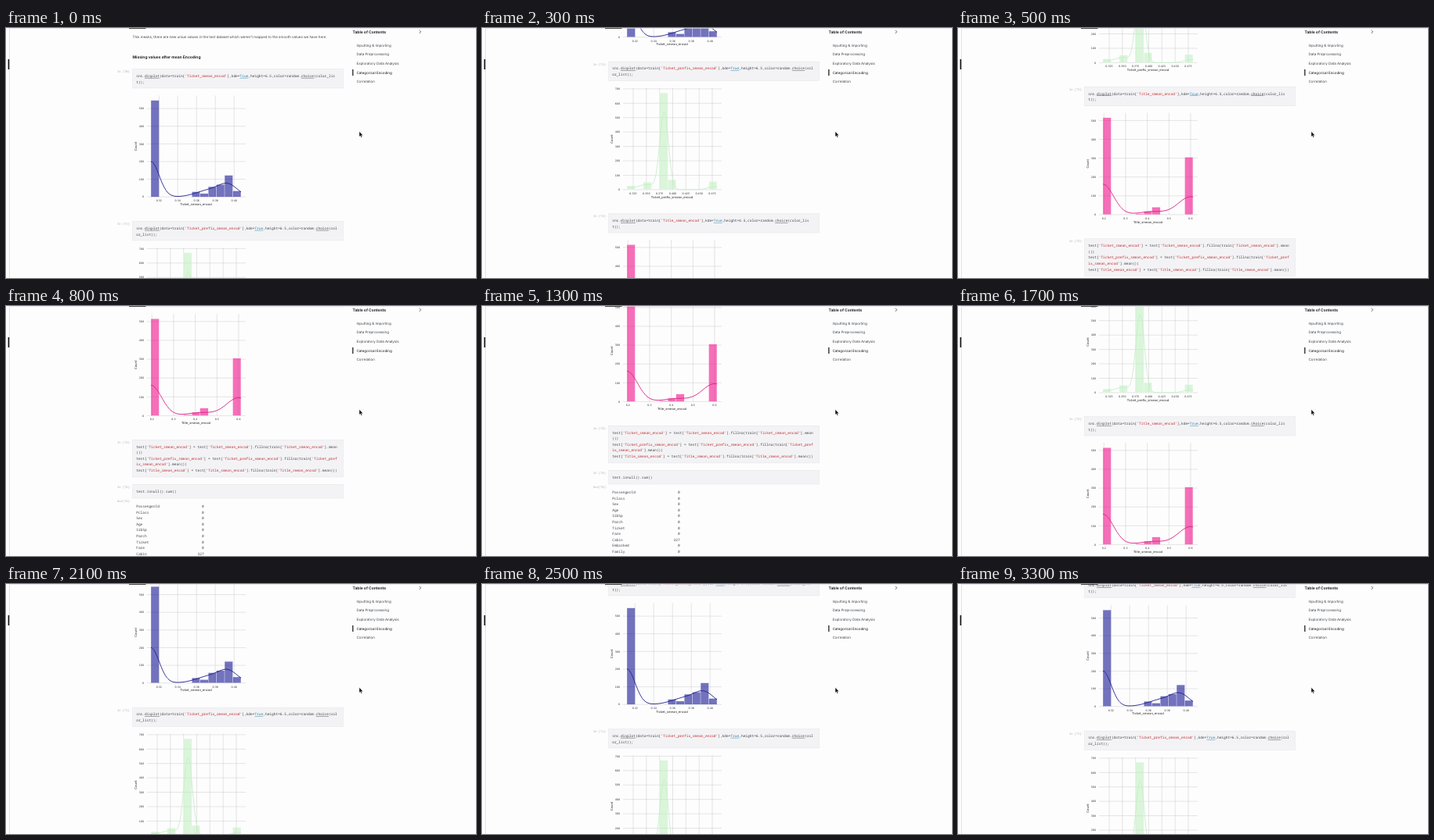
Animation of 600x320 px, one loop 3400 ms. Source, as an HTML page:

```html
<!DOCTYPE html>
<html lang="en">
<head>
<meta charset="utf-8">
<title>Notebook scroll</title>
<style>
  html, body { margin: 0; width: 100%; height: 100%; overflow: hidden; background: #fdfdfe; }
  svg { display: block; width: 100vw; height: 100vh; }
  text { white-space: pre; text-rendering: geometricPrecision; }
  .prose { font: 4.49px Inter, sans-serif; fill: #3c4043; }
  .head { font: 700 4.95px Inter, sans-serif; fill: #202124; }
  .code { font: 4.51px "Noto Sans Mono", monospace; fill: #3f4245; }
  .prompt { font: 3.75px "Noto Sans Mono", monospace; fill: #a9abb0; text-anchor: end; }
  .tick { font: 3.3px "DejaVu Sans", sans-serif; fill: #333; }
  .label { font: 3.9px "DejaVu Sans", sans-serif; fill: #222; text-anchor: middle; }
  .mid { text-anchor: middle; }
  .end { text-anchor: end; }
  .str { fill: #c0282d; }
  .kw { fill: #2f80a8; text-decoration: underline; }
  .fn { text-decoration: underline; }
  .cell { fill: #f3f3f5; stroke: #e3e3e6; stroke-width: .5; }
  .grid { stroke: #cbcbcb; stroke-width: .5; fill: none; }
  .active { fill: #111; }
</style>
</head>
<body>
<svg viewBox="0 0 600 320" preserveAspectRatio="none">
  <g id="page"></g>
  <path d="M4 .4H600" stroke="#dedee6" stroke-width=".8"/>
  <path d="M4.5 0V320" stroke="#dcdce2" stroke-width=".8"/>
  <path d="M157 .4H178.5" stroke="#222" stroke-width=".9"/>
  <rect x="2.6" y="40" width="1.6" height="13" fill="#111"/>
  <g id="toc">
    <text class="head" x="442.5" y="7.4">Table of Contents</text>
    <path d="M527.6 2.8L529.7 4.9L527.6 7" fill="none" stroke="#333" stroke-width=".7"/>
    <rect x="442.2" y="53" width="1.2" height="8" fill="#111"/>
  </g>
  <path d="M451 132.6V139.2L452.5 137.8L453.5 140.2L454.6 139.7L453.6 137.4H455.7Z" fill="#000" stroke="#fff" stroke-width=".4"/>
</svg>
<script>
const page = document.getElementById('page');
const toc = document.getElementById('toc');
const LINE = 7.62, BIN = 10.45, LEFT = 185;

const text = (cls, x, y, s, more = '') => `<text class="${cls}" x="${x}" y="${y}" ${more}>${s}</text>`;

function paint(code) {
  return code.replace(/('[^']*')|\b(True)\b|\b(displot|choice)\b/g, (m, str, kw) => {
    const open = `<tspan class="${str ? 'str' : kw ? 'kw' : 'fn'}">`;
    return open + m.replace('\n', `</tspan>\n${open}`) + '</tspan>';
  });
}

function lines(code, y) {
  return code.split('\n').map((s, i) => text('code', 166.2, y + i * LINE, s)).join('');
}

function cell(top, height, num, code) {
  return `<rect class="cell" x="161.7" y="${top}" width="268.6" height="${height}"/>` +
    text('prompt', 160, top + 4.6, `In [${num}]:`) + lines(paint(code), top + 10.3);
}

function plotCell(top, num, col, wrap) {
  return cell(top, 24.3, num,
    `sns.displot(data=train['${col}'],kde=True,height=6.5,color=random.choice(${wrap}));`);
}

// bars: [bin, count]; bumps: [height, centre, spread] of the density curve
function chart({ base, unit, max, xs, x0, dx, name, color, line, alpha, bars, bumps }) {
  const Y = v => base - v * unit / 100;
  const top = Y(max * 1.05);
  let grid = '', labels = '', curve = '';
  for (let v = 0; v <= max * 1.05; v += 100) {
    grid += `M180 ${Y(v)}H306`;
    labels += text('tick end', 176, Y(v) + 1.2, v);
  }
  xs.forEach((s, i) => {
    const x = x0 + i * dx;
    grid += `M${x} ${top}V${base}`;
    labels += text('tick mid', x, base + 5.8, s);
  });
  const rects = bars.map(([i, v]) =>
    `<rect x="${LEFT + i * BIN}" y="${Y(v)}" width="${BIN}" height="${base - Y(v)}" fill="${color}" fill-opacity="${alpha}" stroke="#fff" stroke-width=".3"/>`).join('');
  for (let x = LEFT; x <= 300; x++) {
    const v = bumps.reduce((sum, [h, m, s]) => sum + h * Math.exp(-(((x - m) / s) ** 2) / 2), 0);
    curve += `${curve ? 'L' : 'M'}${x} ${Y(v).toFixed(2)}`;
  }
  const mid = (top + base) / 2;
  return `<path class="grid" d="${grid}"/>${rects}` +
    `<path d="${curve}" fill="none" stroke="${line}" stroke-width=".9"/>` + labels +
    text('label', 242.5, base + 10.7, name) +
    text('label', 167, mid, 'Count', `transform="rotate(-90 167 ${mid})"`);
}

const nulls = ['PassengerId', 'Pclass', 'Sex', 'Age', 'SibSp', 'Parch', 'Ticket', 'Fare', 'Cabin', 'Embarked', 'Family']
  .map(s => s + (s === 'Cabin' ? '327' : '0').padStart(32 - s.length)).join('\n');

page.innerHTML =
  text('prose', 161.5, 13.1, "This means, there are new uniue values in the test dataset which weren't mapped to the smooth values we have here") +
  text('head', 161.5, 38.6, 'Missing values after mean Encoding') +
  plotCell(52.6, 70, 'Ticket_smean_encod', 'color_lis\nt') +
  chart({
    base: 216.2, unit: 22.62, max: 546, name: 'Ticket_smean_encod',
    xs: ['0.32', '0.34', '0.36', '0.38', '0.40'], x0: 195.3, dx: 23.97,
    color: '#00008b', line: '#23238f', alpha: .55,
    bars: [[0, 546], [5, 29], [6, 19], [7, 58], [8, 70], [9, 122], [10, 34]],
    bumps: [[200, 185, 10.5], [62, 284, 12], [38, 260, 17]]
  }) +
  plotCell(247.6, 71, 'Ticket_prefix_smean_encod', 'col\nor_list') +
  chart({
    base: 411.4, unit: 18.43, max: 672, name: 'Ticket_prefix_smean_encod',
    xs: ['0.325', '0.350', '0.375', '0.400', '0.425', '0.450', '0.475'], x0: 193, dx: 16.83,
    color: '#c0eec0', line: '#c8f0c8', alpha: .55,
    bars: [[0, 27], [2, 53], [4, 672], [5, 70], [10, 57]],
    bumps: [[540, 232.5, 5.5], [35, 210, 10], [10, 187, 8], [20, 296, 8]]
  }) +
  plotCell(442.2, 72, 'Title_smean_encod', 'color_lis\nt') +
  chart({
    base: 605.9, unit: 24.1, max: 515, name: 'Title_smean_encod',
    xs: ['0.2', '0.3', '0.4', '0.5', '0.6'], x0: 186.3, dx: 27.67,
    color: '#f0128a', line: '#dc2487', alpha: .6,
    bars: [[0, 515], [4, 5], [5, 18], [6, 40], [10, 305]],
    bumps: [[162, 185, 13.5], [16, 248, 16], [95, 297, 16]]
  }) +
  cell(636.8, 47.6, 73, ['Ticket_smean_encod', 'Ticket_prefix_smean_encod', 'Title_smean_encod']
    .map(c => `test['${c}'] = test['${c}'].fillna(train['${c}'].mean())`).join('\n')
    .replace('mean()', 'mean\n()').replace("train['Ticket_prefix", "train['Ticket_pref\nix")) +
  cell(693.9, 17.6, 74, 'test.isnull().sum()') +
  text('prompt', 160, 716.8, 'Out[74]:') +
  lines(nulls, 723.4);

['Inputting &amp; Importing', 'Data Preprocessing', 'Exploratory Data Analysis', 'Categorical Encoding', 'Correlation']
  .forEach((s, i) => {
    toc.insertAdjacentHTML('beforeend', text(i === 3 ? 'prose active' : 'prose', 447.5, 23.6 + i * 11.7, s));
  });

// scroll offset at each 100 ms step; the last one holds
const SCROLL = [0, 30, 105, 204.5, 300, 367, 411, 443, 465.5, 473, 478, 481, 482.5, 483.5,
  480, 455, 395, 300.5, 216, 153, 113, 89.5, 77, 69.5, 65, 62, 60.5, 59.5];
const start = performance.now();

function draw() {
  const step = Math.floor((performance.now() - start) % 3400 / 100);
  const y = SCROLL[Math.min(step, SCROLL.length - 1)];
  page.setAttribute('transform', `translate(0 ${-y})`);
  requestAnimationFrame(draw);
}
draw();
</script>
</body>
</html>
```
